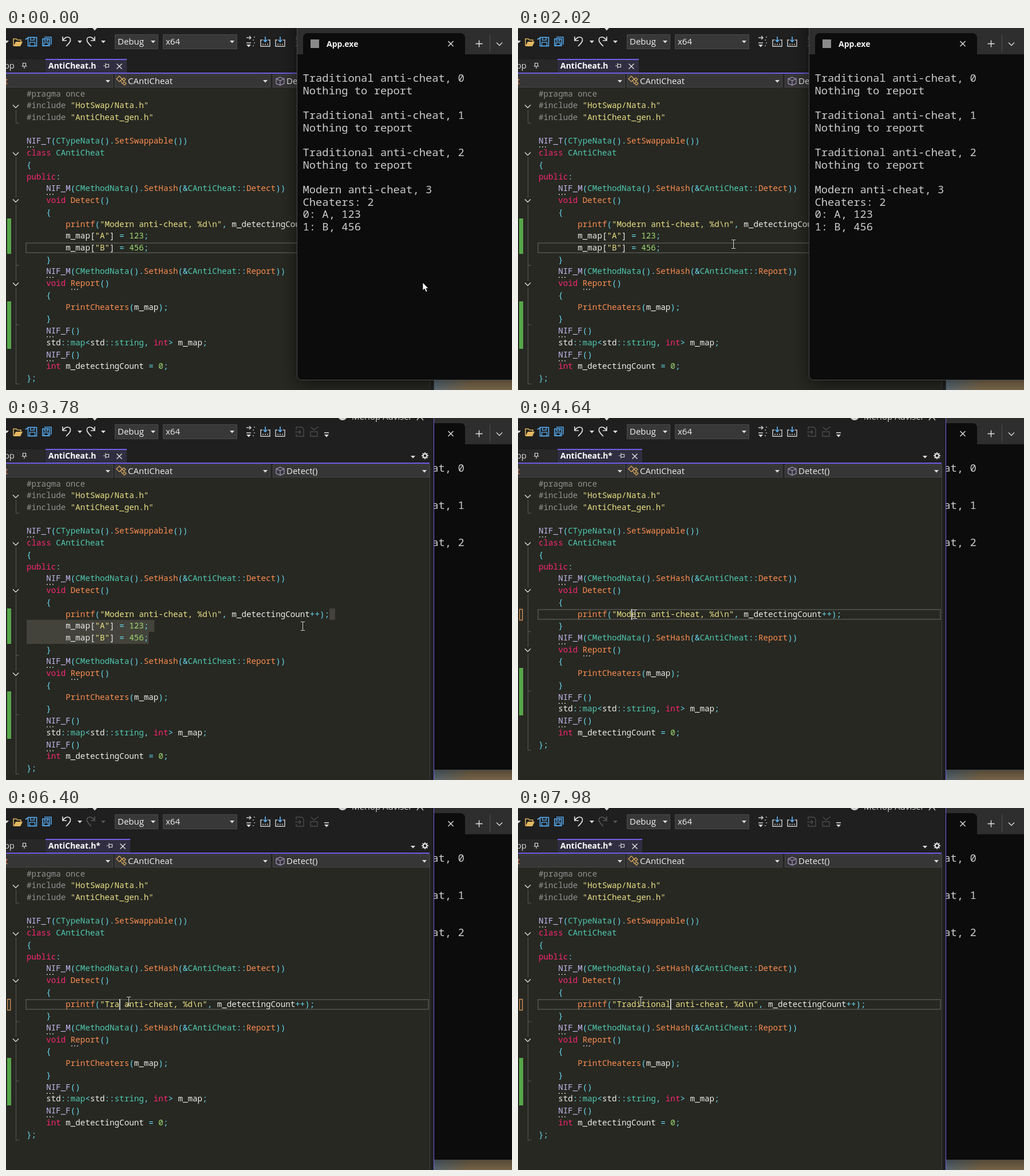
Animation of 884 by 633 pixels, one loop 8000 ms. Source, as an HTML page with a canvas:

```html
<!DOCTYPE html>
<html lang="en">
<head>
<meta charset="utf-8">
<title>Hot swap</title>
<style>
html, body { margin: 0; width: 100%; height: 100%; overflow: hidden; background: #1f1f1f; }
canvas { display: block; }
</style>
</head>
<body>
<canvas id="stage" width="884" height="633"></canvas>
<script>
const g = document.getElementById('stage').getContext('2d');
const LOOP = 8000, RAISE = 2340, DRAG = 2520, DRAG_END = 3350, CUT = 3950;
const CLICK = 4480, PICK = 4850, NUDGE = 5130, REDO_OFF = 5240;
const KEYS = [5840, 6210, 6400, 6890, 7030, 7270, 7340, 7510, 7680, 7860, 7980];
const CW = 8.532, LEFT = 36, PITCH = 20.73;
const MONO = '"Noto Sans Mono", "DejaVu Sans Mono", monospace';
const SANS = '"Open Sans", "Noto Sans", sans-serif';
const CODE = '14.22px ' + MONO, TERM = '500 18.82px ' + MONO;
const UI = '15px ' + SANS, BOLD = 'bold 14px ' + SANS;

const HEAD = `#pragma once
#include "HotSwap/Nata.h"
#include "AntiCheat_gen.h"

NIF_T(CTypeNata().SetSwappable())
class CAntiCheat
{
public:
    NIF_M(CMethodNata().SetHash(&CAntiCheat::Detect))
    void Detect()
    {`.split('\n');
const BODY = ['        m_map["A"] = 123;', '        m_map["B"] = 456;'];
const TAIL = `    }
    NIF_M(CMethodNata().SetHash(&CAntiCheat::Report))
    void Report()
    {
        PrintCheaters(m_map);
    }
    NIF_F()
    std::map<std::string, int> m_map;
    NIF_F()
    int m_detectingCount = 0;
};`.split('\n');
const OUTPUT = [0, 1, 2].flatMap(i => [`Traditional anti-cheat, ${i}`, 'Nothing to report', ''])
  .concat('Modern anti-cheat, 3', 'Cheaters: 2', '0: A, 123', '1: B, 456');

// Each group of TOKEN takes the colour at the same place in INK
const TOKEN = /("[^"]*")|(#\w+(?: once)?)|\b(class|public|void|int)\b|(NIF_\w)|\b(C[A-Z]\w+|map|string)\b|\b(printf|PrintCheaters|SetSwappable|SetHash|Detect|Report)\b|\b(\d+)\b|([(){}<>&:;,.=+]+)|[^\s(){}<>&:;,.=+"]+?(?=[\s(){}<>&:;,.=+"]|$)/g;
const INK = ['#e9df85', '#929292', '#f92672', '#c3b6ee', '#4ec9b0', '#fb8d50', '#9fdb72', '#66d9ef'];

const rect = (c, x, y, w, h) => { g.fillStyle = c; g.fillRect(x, y, w, h); };
const frame = (c, lw, x, y, w, h) => { g.strokeStyle = c; g.lineWidth = lw; g.strokeRect(x, y, w, h); };
const text = (s, x, y, font, c) => { g.font = font; g.fillStyle = c; g.fillText(s, x, y); };
const mid = row => 114.9 + PITCH * row;
const colX = col => LEFT + col * CW;

// Strokes and fills an SVG path placed at x, y
function icon(x, y, d, stroke, lw = 1.4, fill) {
  const p = new Path2D(d);
  g.save();
  g.translate(x, y);
  if (fill) { g.fillStyle = fill; g.fill(p); }
  if (stroke) { g.strokeStyle = stroke; g.lineWidth = lw; g.stroke(p); }
  g.restore();
}
const drop = (x, y, c = '#ddd') => icon(x, y, 'M-4-2H4L0 2.5z', null, 0, c);
const chevron = (x, y) => icon(x, y, 'M-5-2.5L0 2.5L5-2.5', '#d5d5d5', 1.5);
const cross = (x, y) => icon(x, y, 'M-4.5-4.5l9 9m0-9l-9 9', '#e4e4e4');
function roundBox(c, ...box) {
  g.beginPath();
  g.roundRect(...box, 8);
  g.fillStyle = c;
  g.fill();
}

// Each move runs to x, y; pow > 1 slows its end, bow bends it downwards
const MOVES = [
  { from: 930, to: 1640, x: 431, y: 386.5, pow: 1, bow: 5.5 },
  { from: 1740, to: 2020, x: 375.5, y: 378, pow: 1.4, bow: 0 },
  { from: DRAG, to: DRAG_END, x: 604.5, y: 343, pow: 1.4, bow: 0 },
  { from: 3660, to: 4440, x: 203.5, y: 343, pow: 1.46, bow: 31 },
  { from: NUDGE, to: 5350, x: 213.5, y: 338, pow: 1, bow: 0 },
];
function pointer(t) {
  let x = 727.5, y = 444.5;
  for (const m of MOVES) {
    const u = Math.min(1, Math.max(0, (t - m.from) / (m.to - m.from)));
    const p = 1 - (1 - u) ** m.pow;
    x += (m.x - x) * p;
    y += (m.y - y) * p + 4 * p * (1 - p) * m.bow;
  }
  return [x, y];
}
function drawPointer(t) {
  const [x, y] = pointer(t).map(Math.round);
  const arrow = (t < RAISE && x > 508) || (t >= NUDGE && t < KEYS[0]);
  if (arrow) icon(x, y, 'M0 0V14L3.2 11L5.7 16.6L8.2 15.5L5.8 10.2H10z', '#000', 0.8, '#fff');
  else icon(x, y, 'M.5-7V7M-3-7.5H0L.5-7L1-7.5H4M-3 7.5H0L.5 7L1 7.5H4', '#d8d8d8', 1);
}

function floppy(x, y, s) {
  const c = '#55aaf0';
  frame(c, 1.6, x, y, s, s);
  frame(c, 1.3, x + s * .28, y, s * .44, s * .32);
  frame(c, 1.3, x + s * .2, y + s * .56, s * .6, s * .44);
}
function turn(x, dir, c) {
  g.save();
  g.translate(x, 24);
  g.scale(dir, 1);
  icon(0, 0, 'M-7-9V-2H0M-7-2C-1-11 8-9 6.5-2Q6 1-1 8', c, 1.7);
  g.restore();
}
function combo(x, w, s) {
  rect('#383838', x, 11, w, 26);
  frame('#4a4a4a', 1, x + .5, 11.5, w - 1, 25);
  text(s, x + 5, 29, UI, '#f2f2f2');
  drop(x + w - 9, 24);
}
function loader(x) {
  icon(x, 24, 'M-5-3H-8V8H8V-3H5M-5 4.5h2m2 0h2m2 0h2', '#d0d0d0');
  icon(x, 24, 'M0-9V0M-3.5-3.5L0 0L3.5-3.5', '#62b0ee', 1.7);
}

function toolbar(t) {
  rect('#1f1f1f', 0, 0, 748, 81);
  rect('#555', 0, 0, 143, 1);
  drop(155, 2);
  icon(588, -4, 'M-8 0a8 8 0 0 0 16 0z', null, 0, '#cfcfcf');
  text('Merlop Adviser', 604, 2.5, UI, '#d5d5d5');
  icon(723, 0, 'M-5 4Q0-6 6 4', '#d5d5d5');

  drop(1, 24);
  icon(12, 24, 'M1 7V-5H6L8-3H14V0', '#e3b861', 1.5);
  icon(12, 24, 'M1 8L5 0H17L13 8z', null, 0, '#e3b861');
  icon(36, 18, 'M-2 2L3-1', '#70b7f0', 1.5);
  floppy(38.5, 16.5, 15);
  icon(67, 16, 'M0 0H12V13', '#55aaf0', 1.5);
  floppy(64, 19, 12);
  const redo = t < REDO_OFF ? '#e0e0e0' : '#555';
  turn(106, 1, '#e0e0e0');
  drop(129, 24);
  turn(148, -1, redo);
  drop(170, 24, redo);
  combo(190, 76, 'Debug');
  combo(274, 130, 'x64');

  icon(420, 17, 'M0 0H8M5-3L8 0L5 3M0 9H8', '#d0d0d0');
  drop(424, 31);
  for (let y = 15; y < 33; y += 5) rect('#8a8a8a', 431 + (y % 2) * 2, y, 2, 2);
  loader(453);
  loader(479);
  icon(513, 24, 'M-6-3V-8H4L7-5V8H-6V4M-8 .5H2M-1-3L2 .5L-1 4', '#4b4b4b');
  icon(538, 24, 'M-6 0H6V8H-6zM-5-8L0-3L8-9', '#4b4b4b');
  rect('#ddd', 556, 25, 8, 1.5);
  drop(560, 31);
}

function pin(x, flat) {
  g.save();
  g.translate(x, 66);
  if (flat) g.rotate(Math.PI / 2);
  icon(0, 0, 'M-2.5 1V-4.5H2.5V1M-4.5 1H4.5M0 1V5', '#dcdcdc', 1.2);
  g.restore();
}
function gear(x, y) {
  g.strokeStyle = '#ddd';
  g.lineWidth = 2;
  for (let i = 0; i < 8; i++) {
    const a = i * Math.PI / 4;
    g.beginPath();
    for (const r of [3, 6]) g.lineTo(x + r * Math.cos(a), y + r * Math.sin(a));
    g.stroke();
  }
  g.beginPath();
  g.arc(x, y, 3.2, 0, 7);
  g.stroke();
}
function tabs(dirty) {
  const right = dirty ? 217 : 211;
  rect('#282829', 0, 55, 68, 23);
  text('cpp', -10.5, 71, UI, '#d5d5d5');
  pin(32);
  rect('#302e40', 69, 54, right - 69, 25);
  rect('#7160e8', 69, 54, right - 69, 2);
  rect('#7160e8', 0, 78, 740, 2);
  text('AntiCheat.h' + (dirty ? '*' : ''), 74, 71, BOLD, '#fff');
  pin(right - 36, true);
  cross(right - 13, 67);
  drop(711, 68);
  gear(732, 66);

  rect('#272727', 0, 80, 740, 25);
  for (const [x, end] of [[-2, 187], [190, 462], [466, 740]]) {
    rect('#363636', x, 81, end - x, 23);
    frame('#464646', 1, x + .5, 81.5, end - x - 1, 22);
    drop(end - 9, 93);
  }
  text('t', -2, 98, UI, '#fb8d50');
  text('CAntiCheat', 213, 98, UI, '#f0f0f0');
  text('Detect()', 490, 98, UI, '#f0f0f0');
  icon(198, 89, 'M-5 0L0-5L5 0L0 5zM2 2L5 8H7M5 1L8-2L11 1L8 4zM6 8L9 5L12 8L9 11z', '#e0b062', 1.2);
  icon(479, 93, 'M0-7L7-4V4L0 7L-7 4V-4zM-7-4L0-1L7-4M0-1V7', '#a999c8', 1.2);
}

function codeLine(s, row) {
  const y = Math.round(mid(row) + 4.6);
  for (const m of s.matchAll(TOKEN)) {
    const kind = m.slice(1).findIndex(Boolean);
    text(m[0], colX(m.index), y, CODE, INK[kind] || '#ececec');
  }
  const hint = s.search(/NIF_|Report\(/);
  if (hint >= 0)
    for (let i = 0; i < 3; i++) rect('#a0a0a0', Math.round(colX(hint)) + 1 + i * 5, y + 5, 2, 2);
}
function margin(cut) {
  const up = cut ? 2 : 0;
  const top = row => Math.round(mid(row) - 10);
  const fold = (row, last) => icon(17.5, mid(row) + 6, `M0 0V${(last - row) * PITCH + 4}h5.5`, '#5a5a58', 1);
  if (cut) frame('#d4935a', 1.4, 2.7, 334.5, 5, 19);
  else rect('#57a64a', 2, top(11), 7, 62);
  rect('#57a64a', 2, top(18 - up), 7, 83);
  fold(1, 2);
  for (const last of [14, 19, 24]) fold(5, last - up);
  for (const row of [1, 5, 9, 16 - up]) {
    const y = Math.round(mid(row)) + 1;
    rect('#272822', 11, y - 6, 13, 12);
    chevron(17, y);
  }
}

// Spans [row, first x, last x] between the dragged pointer and the end of the last statement
function dragged(t, callEnd) {
  const [x, y] = pointer(Math.min(t, DRAG_END));
  const row = Math.round((y - mid(0)) / PITCH), bodyEnd = colX(25);
  if (row > 12) return [];
  const spans = [[13, LEFT, bodyEnd]];
  if (row === 12) return [...spans, [12, bodyEnd, bodyEnd + 10]];
  return [...spans, [12, LEFT, bodyEnd + 10], [11, Math.min(x, callEnd), callEnd + 10]];
}

function editor(t) {
  const cut = t >= CUT, typed = KEYS.filter(k => k <= t).length;
  const word = typed ? 'Traditional'.slice(0, typed) : 'Modern';
  const call = `        printf("${word} anti-cheat, %d\\n", m_detectingCount++);`;
  const lines = [...HEAD, call, ...(cut ? [] : BODY), ...TAIL];
  rect('#272822', 0, 105, 740, 528);

  let spans = [];
  if (t >= DRAG && !cut) spans = dragged(t, colX(call.length));
  if (t >= PICK && !typed) spans = [[11, colX(16), colX(22)]];
  for (const [row, x, end] of spans) {
    const top = Math.round(mid(row) - PITCH / 2);
    rect('#43433b', x, top, end - x, Math.round(mid(row) + PITCH / 2) - top);
  }

  const y = Math.round(mid(cut ? 11 : 13));
  if (!spans.length) frame('#494a45', 2, 35, y - 8, 703, 17);
  margin(cut);
  lines.forEach(codeLine);
  if (!spans.length && t >= RAISE + 40) {
    const col = !cut ? 25 : t < CLICK ? call.length : typed ? 16 + typed : 19;
    rect('#f4f4f4', Math.round(colX(col)), y - 9, 1.5, 19);
  }
}

function ide(t) {
  toolbar(t);
  tabs(t >= CUT);
  editor(t);
  rect('#1f1f1f', 740, 81, 8, 552);
  rect('#3d3d3d', 740, 81, 1, 552);
  rect(t < RAISE ? '#3c3c3c' : '#7160e8', 747, 0, 1, 633);
}

function terminal() {
  const box = [508.5, -20, 420, 635.5];
  g.save();
  g.shadowColor = 'rgba(0,0,0,.55)';
  g.shadowBlur = 30;
  g.shadowOffsetY = 6;
  roundBox('#0c0c0c', ...box);
  g.restore();
  rect('#2e2e2e', 509, 0, 375, 46);
  roundBox('#0c0c0c', 519, 9, 283, 50);
  frame('#4c4c4c', 1, 0, 0, 0, 0);
  g.beginPath();
  g.roundRect(...box, 8);
  g.stroke();
  rect('#8a8a8a', 532, 20, 15, 15);
  text('App.exe', 560, 33, BOLD, '#f4f4f4');
  cross(777, 27.5);
  icon(826.5, 27.5, 'M-6 0H6M0-6V6', '#e4e4e4');
  rect('#505050', 845, 12, 1, 30);
  chevron(862, 28);
  OUTPUT.forEach((s, i) => text(s, 518.5, Math.round(94 + 21.67 * i), TERM, '#cccccc'));
}

function wallpaper() {
  const sky = g.createLinearGradient(748, 612, 800, 640);
  sky.addColorStop(0, '#5b7283');
  sky.addColorStop(1, '#857152');
  rect(sky, 748, 612, 136, 21);
}

function draw(now) {
  const t = now % LOOP;
  wallpaper();
  if (t < RAISE) { ide(t); terminal(); }
  else { terminal(); ide(t); }
  drawPointer(t);
}

let start;
function tick(now) {
  start ??= now;
  draw(now - start);
  requestAnimationFrame(tick);
}
draw(0);
requestAnimationFrame(tick);
</script>
</body>
</html>
```
